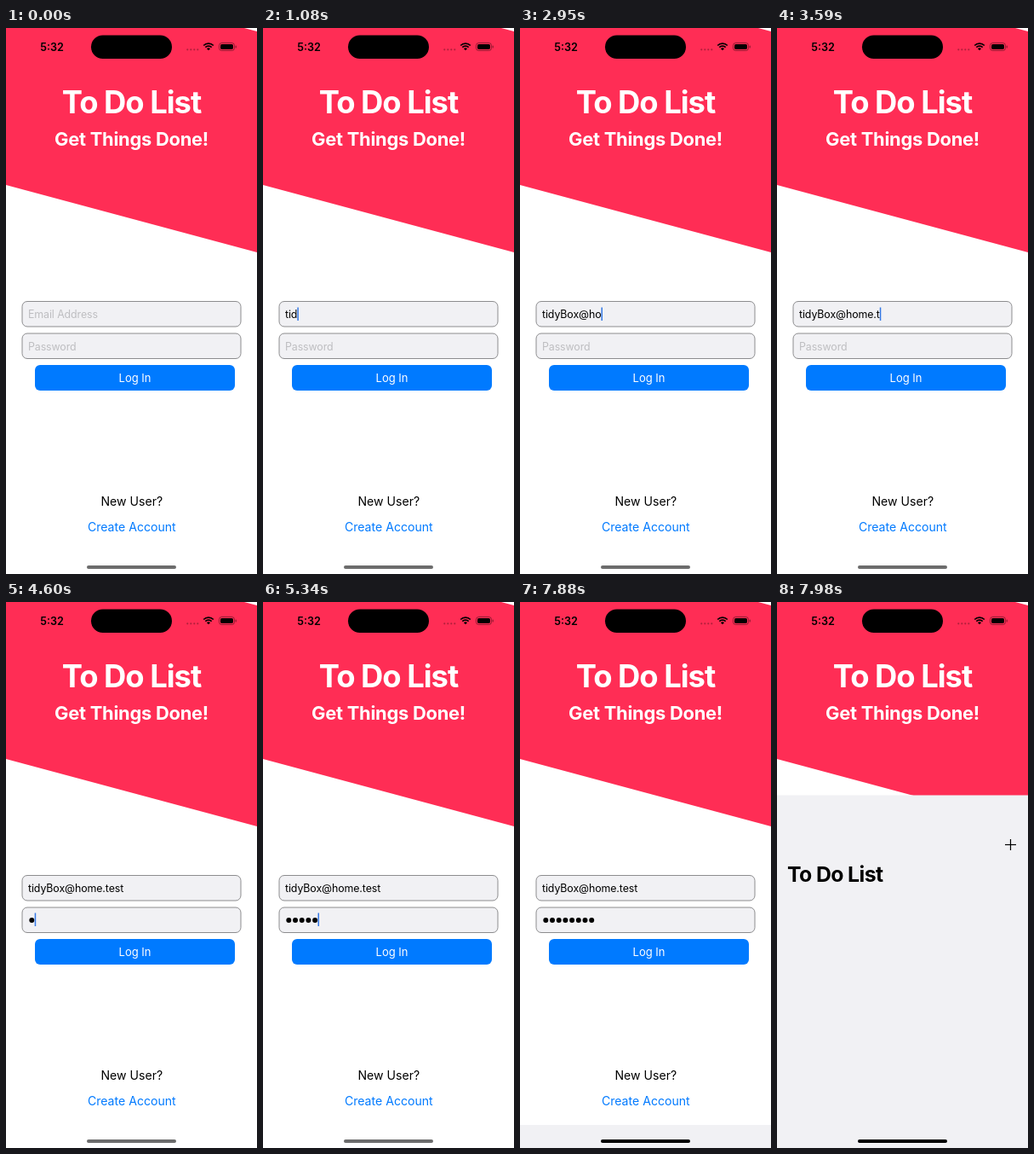
These frames come from a looping animation (295 px wide and 640 px high, 8000 ms). An HTML page with a canvas:

```html
<!DOCTYPE html>
<html lang="en">
<head>
<meta charset="utf-8">
<title>To Do List login</title>
<style>
  html, body { margin: 0; width: 100%; height: 100%; overflow: hidden; background: #fff; }
  canvas { display: block; width: 295px; height: 640px; }
</style>
</head>
<body>
<canvas id="stage"></canvas>
<script>
const W = 295, H = 640, LOOP = 8000;
const FONT = 'Inter, "Liberation Sans", sans-serif';
const RED = '#ff2d55', BLUE = '#007aff', PAPER = '#f1f1f4';

const EMAIL = 'tidyBox@home.test';
const EMAIL_FOCUS = 410, PASSWORD_FOCUS = 4300, LOGIN = 7880, SHEET_UP = 7980;
const emailKeys = [840, 960, 1070, 1190, 1660, 1970, 2130, 2500, 2780,
                   2950, 3070, 3210, 3410, 3590, 3710, 3850, 3850];
const passwordKeys = [4600, 4790, 4790, 5110, 5340, 5540, 5750, 5970];

const canvas = document.getElementById('stage');
const ctx = canvas.getContext('2d');
const scale = window.devicePixelRatio || 1;
canvas.width = W * scale;
canvas.height = H * scale;

const typed = (keys, t) => keys.filter(k => k <= t).length;

function rounded(x, y, w, h, r, fill, stroke) {
  ctx.beginPath();
  ctx.roundRect(x, y, w, h, r);
  ctx.fillStyle = fill;
  ctx.fill();
  if (stroke) {
    ctx.strokeStyle = stroke;
    ctx.lineWidth = 1;
    ctx.stroke();
  }
}

function polygon(points, fill) {
  ctx.beginPath();
  points.forEach(([x, y]) => ctx.lineTo(x, y));
  ctx.fillStyle = fill;
  ctx.fill();
}

function dot(x, y, r, fill) {
  ctx.beginPath();
  ctx.arc(x, y, r, 0, Math.PI * 2);
  ctx.fillStyle = fill;
  ctx.fill();
}

// Draws a line of text and returns its advance width.
function label(text, x, y, size, { weight = 400, color = '#000', align = 'left', tracking = 0 } = {}) {
  ctx.font = `${weight} ${size}px ${FONT}`;
  ctx.letterSpacing = `${tracking * size}px`;
  ctx.textAlign = align;
  ctx.fillStyle = color;
  ctx.fillText(text, x, y);
  return ctx.measureText(text).width;
}

function caret(x, y) {
  ctx.fillStyle = '#3478e5';
  ctx.fillRect(x, y, 1.5, 15.5);
}

function header() {
  polygon([[0, 0], [280, 0], [W, 4], [W, 263], [0, 184]], RED);
  const heading = { weight: 700, color: '#fff', align: 'center' };
  label('To Do List', 147.5, 100, 36.4, { ...heading, tracking: -0.028 });
  label('Get Things Done!', 147.5, 138, 21.9, { ...heading, tracking: -0.012 });
}

function field(y, placeholder, empty) {
  rounded(19, y, 257, 29.5, 6, PAPER, '#8c8c8e');
  if (empty) label(placeholder, 26, y + 19.5, 12.4, { color: '#bebec1', tracking: -0.008 });
}

function form(t) {
  const letters = typed(emailKeys, t);
  field(320.5, 'Email Address', !letters);
  const width = label(EMAIL.slice(0, letters), 26, 340, 12.4, { tracking: -0.008 });
  if (t >= EMAIL_FOCUS && t < PASSWORD_FOCUS) caret(26 + width, 327.5);

  const bullets = typed(passwordKeys, t);
  field(358, 'Password', !bullets);
  for (let i = 0; i < bullets; i++) dot(30.3 + 7.7 * i, 373, 3, '#000');
  if (t >= PASSWORD_FOCUS && t < LOGIN) caret(26 + 7.7 * bullets, 364.5);

  rounded(34, 395, 235, 30, 6, BLUE);
  label('Log In', 151.5, 415, 13, { color: '#fff', align: 'center' });
  label('New User?', 147.8, 559.5, 14.1, { align: 'center' });
  label('Create Account', 147.8, 589.5, 14.1, { color: BLUE, align: 'center' });
}

function sheet(top) {
  ctx.fillStyle = PAPER;
  ctx.fillRect(0, top, W, H - top);
  ctx.fillStyle = '#000';
  ctx.fillRect(268, top + 57.4, 13, 1.2);
  ctx.fillRect(273.9, top + 51.5, 1.2, 13);
  label('To Do List', 12, top + 101, 24.8, { weight: 700, tracking: -0.024 });
}

function wifi(x, y) {
  ctx.strokeStyle = '#000';
  ctx.lineWidth = 1.7;
  for (const r of [5.2, 8.2]) {
    ctx.beginPath();
    ctx.arc(x, y, r, -Math.PI * 0.75, -Math.PI * 0.25);
    ctx.stroke();
  }
  ctx.beginPath();
  ctx.moveTo(x, y);
  ctx.arc(x, y, 2.9, -Math.PI * 0.75, -Math.PI * 0.25);
  ctx.fillStyle = '#000';
  ctx.fill();
}

function statusBar() {
  label('5:32', 54, 26.5, 12.6, { weight: 600, align: 'center' });
  rounded(100, 8.5, 95, 27.5, 13.75, '#000');
  for (let i = 0; i < 4; i++) dot(213.3 + 4 * i, 25.3, 1.1, 'rgba(0,0,0,.3)');
  wifi(238, 26.3);
  rounded(250.5, 17.5, 18, 9, 3, 'rgba(0,0,0,0)', 'rgba(0,0,0,.4)');
  rounded(252, 19, 15, 6, 1.7, '#000');
  rounded(269.6, 20.5, 1.2, 3, 0.6, 'rgba(0,0,0,.45)');
}

function draw(t) {
  ctx.setTransform(scale, 0, 0, scale, 0, 0);
  ctx.fillStyle = '#fff';
  ctx.fillRect(0, 0, W, H);
  header();
  form(t);
  if (t >= LOGIN) sheet(t < SHEET_UP ? 613 : 226.5);
  statusBar();
  rounded(95, 630, 105, 4, 2, t < LOGIN ? '#6c6c6c' : '#000');
}

const start = performance.now();
function tick() {
  draw((performance.now() - start) % LOOP);
  requestAnimationFrame(tick);
}
tick();
</script>
</body>
</html>
```
